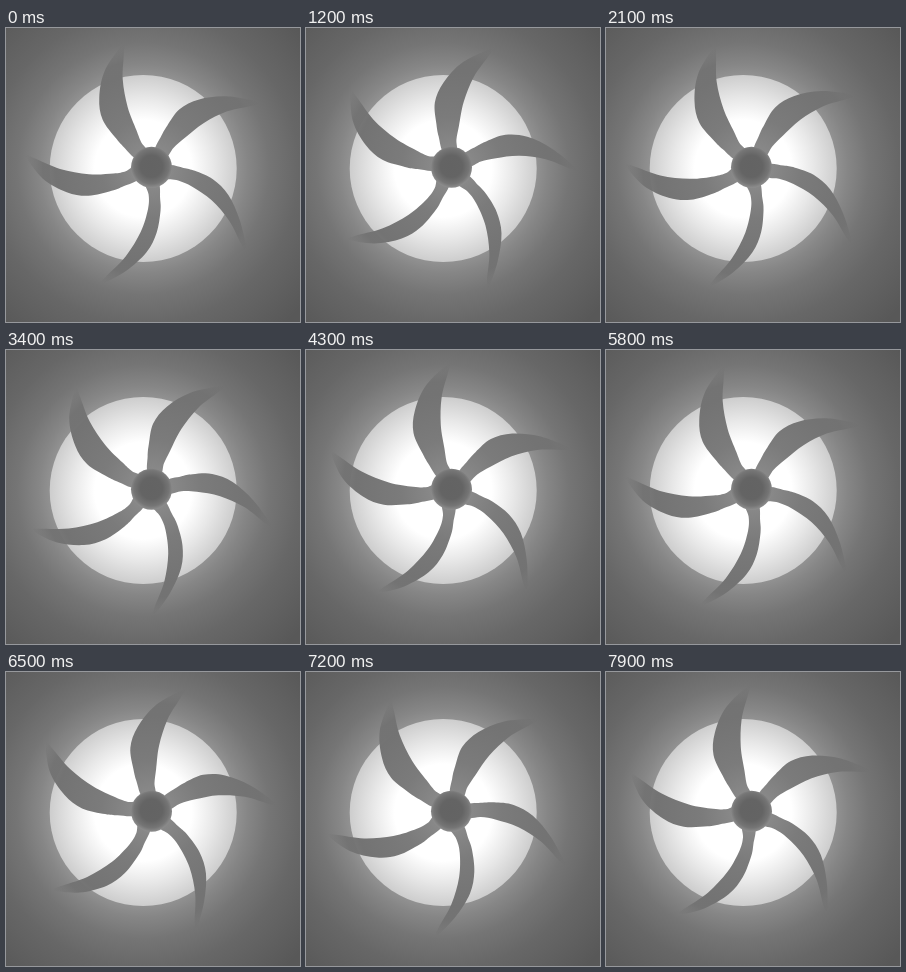
An HTML page with a canvas for the animation above (8000 ms loop, 294 by 294 pixels).

```html
<!DOCTYPE html>
<html lang="en">
<head>
<meta charset="utf-8">
<title>Propeller</title>
<style>
  html, body { margin: 0; width: 100%; height: 100%; overflow: hidden; background: #5c5c5c; }
  canvas { display: block; width: 100vw; height: 100vh; }
</style>
</head>
<body>
<canvas width="294" height="294"></canvas>
<script>
const ctx = document.querySelector('canvas').getContext('2d');
const SIZE = 294, LOOP = 8000, TAU = Math.PI * 2;
const hub = { x: 145.5, y: 139.3, r: 20.5 };
const lamp = { x: 137.2, y: 140.5, r: 93.5 };

// Blade outline: radius, angle in degrees, depth (seen obliquely, so it shifts x)
const outline = [
  [17, 66, 0], [33, 73, 1], [45, 76.5, 1.5], [66, 82.5, 3.5], [85, 91, 3.5], [106, 102, 3.5],
  [126, 113, 0],
  [118, 112.5, 0], [93, 107, -1.5], [66, 102, -3], [42, 99.5, -3.5], [28, 100, -2], [17, 110, 0]
];

function radial(x, y, r0, r1, stops) {
  const gradient = ctx.createRadialGradient(x, y, r0, x, y, r1);
  for (const [at, color] of stops) gradient.addColorStop(at, color);
  return gradient;
}

function disc(x, y, r, fill) {
  ctx.fillStyle = fill;
  ctx.beginPath();
  ctx.arc(x, y, r, 0, TAU);
  ctx.fill();
}

const backdrop = radial(lamp.x, lamp.y, 90, 210, [
  [0, '#959595'], [0.12, '#868686'], [0.3, '#757575'], [0.55, '#676767'], [1, '#585858']
]);
const lampFill = radial(lamp.x, lamp.y, 0, lamp.r, [
  [0, '#fff'], [0.52, '#fff'], [0.75, '#e8e8e8'], [1, '#cdcdcd']
]);
const bladeFill = radial(hub.x, hub.y, 18, 126, [
  [0, '#898989'], [0.3, '#7b7b7b'], [0.72, '#737373'],
  [0.84, 'rgba(113,113,113,.9)'], [1, 'rgba(110,110,110,0)']
]);
const hubFill = radial(hub.x, hub.y - 1, 0, 22, [
  [0, '#636363'], [0.5, '#646464'], [0.8, '#757575'], [1, '#919191']
]);

// Closed Catmull-Rom curve through the points
function smoothPath(points) {
  const at = i => points[(i + points.length) % points.length];
  ctx.beginPath();
  ctx.moveTo(points[0].x, points[0].y);
  points.forEach((p, i) => {
    const before = at(i - 1), next = at(i + 1), after = at(i + 2);
    ctx.bezierCurveTo(
      p.x + (next.x - before.x) / 6, p.y + (next.y - before.y) / 6,
      next.x - (after.x - p.x) / 6, next.y - (after.y - p.y) / 6,
      next.x, next.y);
  });
  ctx.closePath();
}

function drawBlade(turn) {
  smoothPath(outline.map(([r, degrees, depth]) => {
    const a = (degrees + turn) * TAU / 360;
    return { x: hub.x + r * Math.cos(a) - depth, y: hub.y + r * Math.sin(a) };
  }));
  ctx.fillStyle = bladeFill;
  ctx.fill();
}

function draw(time) {
  // A longer first pose, then 4 degrees every 100 ms
  const step = time < 500 ? 0 : Math.floor((time - 400) / 100);
  ctx.fillStyle = backdrop;
  ctx.fillRect(0, 0, SIZE, SIZE);
  disc(lamp.x, lamp.y, lamp.r, lampFill);
  for (let k = 0; k < 5; k++) drawBlade(step * 4 + k * 72);
  disc(hub.x, hub.y, hub.r, hubFill);
}

const start = performance.now();
function tick() {
  draw((performance.now() - start) % LOOP);
  requestAnimationFrame(tick);
}
tick();
</script>
</body>
</html>
```
